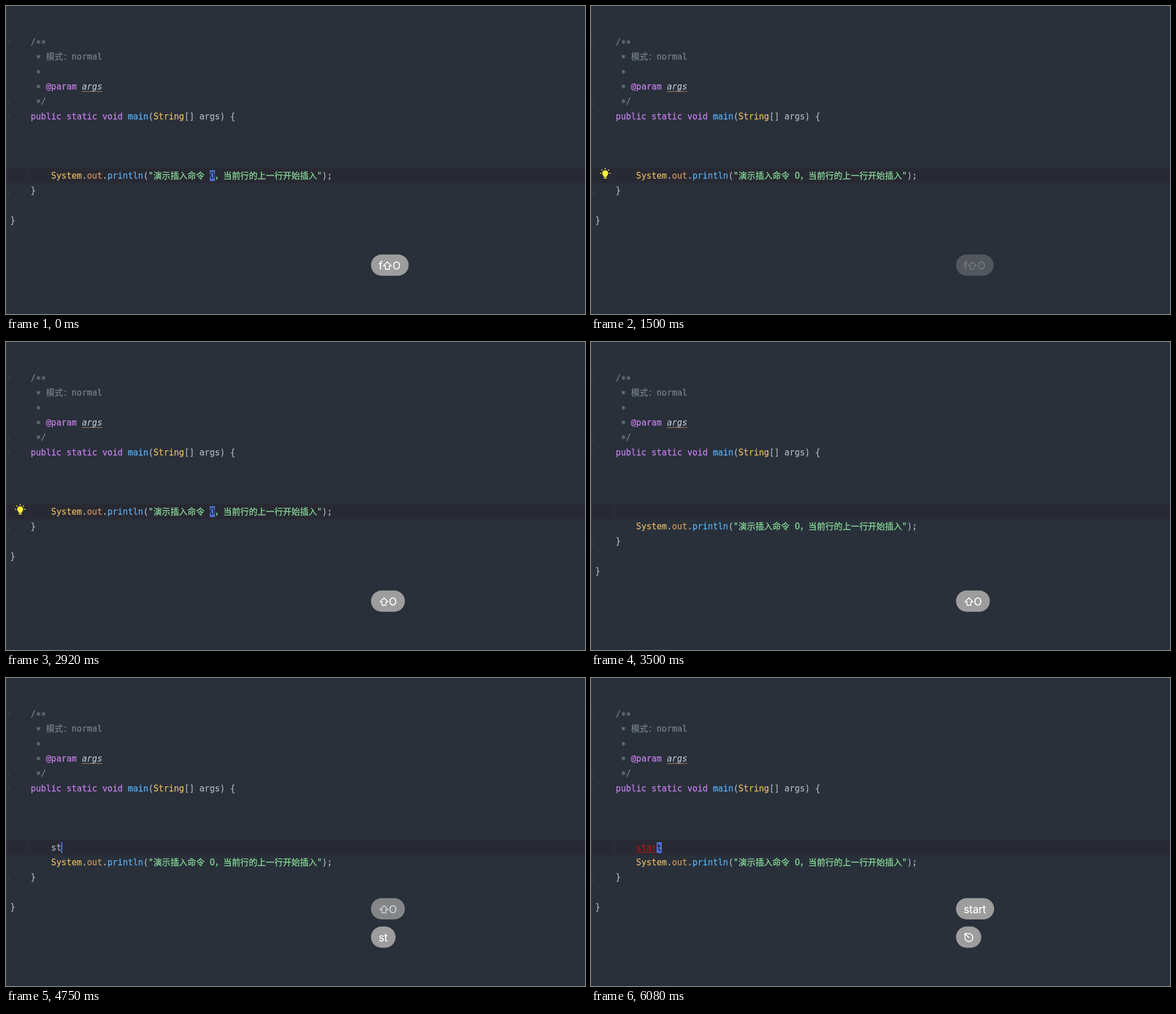
These frames come from a looping animation (1026 by 546 pixels, 6160 ms). An HTML page:

```html
<!DOCTYPE html>
<html lang="zh-CN">
<head>
<meta charset="utf-8">
<title>Insert line above</title>
<style>
  html, body { margin: 0; width: 100%; height: 100%; overflow: hidden; background: #29303a; }
  svg { display: block; width: 100vw; height: 100vh; }
  text { white-space: pre; fill: currentColor; stroke: currentColor; stroke-width: 0.25px; }
  .code { font: 15.05px "DejaVu Sans Mono", monospace; }
  .han { font: 15.1px "Noto Sans CJK SC", "Noto Sans CJK", sans-serif; }
  .key { font: 18.5px Inter, sans-serif; color: #fff; }
  .line { fill: none; stroke-linecap: round; stroke-linejoin: round; }
</style>
</head>
<body>
<svg id="stage" viewBox="0 0 1026 546"></svg>
<script>
const LOOP = 6160, FPS = 12;
const ADV = 9.06, LEFT = 7.6, PITCH = 26.3;
const C = {
  bg: '#29303a', row: '#282933', guide: '#30343f', gutter: '#3a444e',
  doc: '#74818c', word: '#c67fec', fn: '#57b1f5', type: '#e3b862',
  field: '#c8925a', str: '#89dc98', text: '#a9b3c0', arg: '#b4c0cf',
  wave: '#c6a65a', caret: '#4c70d2', dark: '#1d2236', error: '#b5160f',
  bulb: '#fdee3c', pill: '#9d9d9d'
};

// Steps of the 12-per-second clock at which things happen
const AT = {
  bulb: 5, fade1: 14, open: 35, insert: 36, typing: [56, 57, 59, 60, 61],
  fade2: 56, escape: 68, error: 72
};
const PILL_W = { 1: 37, 2: 43.5, 3: 53.5, 4: 60.5, 5: 67.5 };

const col = n => LEFT + n * ADV;
const base = row => 69.1 + row * PITCH;

function add(parent, tag, attrs = {}, body) {
  const el = document.createElementNS('http://www.w3.org/2000/svg', tag);
  for (const k in attrs) el.setAttribute(k, attrs[k]);
  if (body !== undefined) el.textContent = body;
  parent.appendChild(el);
  return el;
}
const group = parent => add(parent, 'g');
const rect = (p, x, y, width, height, fill, rx = 0) =>
  add(p, 'rect', { x, y, width, height, fill, rx });
const stroke = (p, d, color, width) =>
  add(p, 'path', { d, class: 'line', stroke: color, 'stroke-width': width });
const write = (p, x, y, color, body, cls = 'code') =>
  add(p, 'text', { x, y, color, class: cls }, body);
const show = (el, on) => el.setAttribute('display', on ? 'inline' : 'none');

// Each piece is [column, colour, words]
function code(p, row, ...parts) {
  for (const [c, color, words] of parts) write(p, col(c), base(row), color, words);
}
const star = (p, c, row) => write(p, col(c), base(row) + 2.8, C.doc, '*');

function fold(p, y, up) {
  const s = up ? -1 : 1;
  stroke(p, `M0 ${y - 5 * s}H5.5V${y + s}L1 ${y + 5 * s}`, C.gutter, 1);
}

const svg = document.getElementById('stage');
rect(svg, 0, 0, 1026, 546, C.bg);
rect(svg, 0, 287.5, 1026, 26.3, C.row);
rect(svg, 40.5, 287.5, 1, 26.3, C.guide);
rect(svg, 0, 0, 1.3, 546, '#343e47');
fold(svg, 65, false);
fold(svg, 171, true);
fold(svg, 197, false);

// Comment and method head
code(svg, 0, [4, C.doc, '/']);
star(svg, 5, 0);
star(svg, 6, 0);
for (const row of [1, 2, 3, 4]) star(svg, 5, row);
write(svg, col(7), base(1), C.doc, '模式：', 'han');
code(svg, 1, [12, C.doc, 'normal']);
code(svg, 3, [7, C.word, '@param']);
write(svg, col(14), base(3), C.arg, 'args').style.fontStyle = 'italic';
let wave = 'M134.5 152.5';
for (let i = 1; i <= 18; i++) wave += `L${134.5 + i * 2} ${i % 2 ? 150.5 : 152.5}`;
stroke(svg, wave, C.wave, 1);
code(svg, 4, [6, C.doc, '/']);
code(svg, 5, [4, C.word, 'public static void'], [23, C.fn, 'main'], [27, C.text, '('],
  [28, C.type, 'String'], [34, C.text, '[] args) {']);

// Lines pushed down by the new one
const below = group(svg);
fold(below, 328.5, true);
code(below, 9, [8, C.type, 'System'], [14, C.text, '.'], [15, C.field, 'out'],
  [18, C.text, '.'], [19, C.fn, 'println'], [26, C.text, '('], [27, C.str, '"']);
const y9 = base(9);
write(below, 261.2, y9, C.str, '演示插入命令', 'han');
const block = rect(below, 361, 291, 9.2, 19.4, C.caret);
const letter = write(below, 360.9, y9, C.str, 'O');
write(below, 370, y9, C.str, '，当前行的上一行开始插入', 'han');
write(below, 551, y9, C.str, '"');
write(below, 560, y9, C.text, ');');
code(below, 10, [4, C.text, '}']);
code(below, 12, [0, C.text, '}']);

// Typed word and its caret
const typed = write(svg, col(8), y9, C.text, '');
const under = rect(svg, 80, 308.2, 36.5, 1.3, C.error);
const caret = rect(svg, 0, 291, 2.3, 19.4, C.caret);
const lastChar = write(svg, col(12), y9, C.dark, 't');

// Light bulb
const bulb = group(svg);
add(bulb, 'circle', { cx: 25.2, cy: 296.5, r: 5.3, fill: C.bulb });
rect(bulb, 22.4, 299.5, 5.6, 3.6, C.bulb);
rect(bulb, 22.4, 304, 5.6, 1.8, C.bulb, 0.8);
for (const a of [-180, -135, -90, -45, 0]) {
  const x = Math.cos(a * Math.PI / 180), y = Math.sin(a * Math.PI / 180);
  stroke(bulb, `M${25.2 + x * 7.6} ${296.5 + y * 7.6}L${25.2 + x * 8.8} ${296.5 + y * 8.8}`, C.bulb, 1.6);
}

// Key pills
function pill(width) {
  const g = group(svg);
  g.box = rect(g, 646.8, 440.5, width, 37.7, C.pill, 18.8);
  return g;
}
function shiftKey(g, x) {
  stroke(g, `M${x + 7.8} 453.6L${x + 15} 460.8H${x + 11.3}V466.6H${x + 4.3}V460.8H${x + 0.6}Z`, '#fff', 1.6);
}
const label = (g, x, words) => add(g, 'text', { x, y: 467, class: 'key' }, words);

const findPill = pill(66.7);
label(findPill, 660.5, 'f');
shiftKey(findPill, 668);
label(findPill, 685, 'O');

const openPill = pill(60);
shiftKey(openPill, 662);
label(openPill, 678.6, 'O');

const wordPill = pill(60);
const wordLabel = label(wordPill, 660.5, '');

const escPill = pill(44.7);
stroke(escPill, 'M668.5 453.2A7 7 0 1 1 662.6 459.2', '#fff', 1.7);
stroke(escPill, 'M669.6 460.2L662.7 453.3M662.5 457.8V453.1H667.2', '#fff', 1.7);

function setPill(g, on, alpha = 1, raised = false) {
  show(g, on && alpha > 0);
  g.setAttribute('opacity', Math.max(0, alpha));
  g.setAttribute('transform', `translate(0 ${raised ? -50.2 : 0})`);
}
const fade = (n, start) => n < start ? 1 : 1 - (n - start + 0.5) / 7;
const blink = (n, start) => Math.floor((n - start) / 6) % 2 === 0;

function draw(ms) {
  const n = Math.floor((ms + 5) * FPS / 1000);
  const inserted = n >= AT.insert, escaped = n >= AT.escape, bad = n >= AT.error;
  const count = AT.typing.filter(s => n >= s).length;
  const word = 'start'.slice(0, count);

  below.setAttribute('transform', `translate(0 ${inserted ? PITCH : 0})`);
  show(bulb, n >= AT.bulb && !inserted);

  const onLetter = !inserted && blink(n, -2);
  show(block, onLetter);
  letter.setAttribute('color', onLetter ? C.dark : C.str);

  typed.textContent = escaped ? 'star' : word;
  typed.setAttribute('color', bad ? C.error : C.text);
  show(under, bad);
  show(lastChar, escaped);

  const since = escaped ? AT.escape : count ? AT.typing[count - 1] : AT.insert - 1;
  show(caret, inserted && blink(n, since));
  caret.setAttribute('x', escaped ? 116.3 : col(8 + count) - 0.6);
  caret.setAttribute('width', escaped ? 9.2 : 2.3);

  setPill(findPill, n < AT.open, fade(n, AT.fade1));
  setPill(openPill, n >= AT.open, fade(n, AT.fade2), count > 0);
  setPill(wordPill, count > 0, 1, escaped);
  wordLabel.textContent = word;
  wordPill.box.setAttribute('width', PILL_W[count] || 37);
  setPill(escPill, escaped);
}

const begin = performance.now();
function frame() {
  draw((performance.now() - begin) % LOOP);
  requestAnimationFrame(frame);
}
draw(0);
requestAnimationFrame(frame);
</script>
</body>
</html>
```
